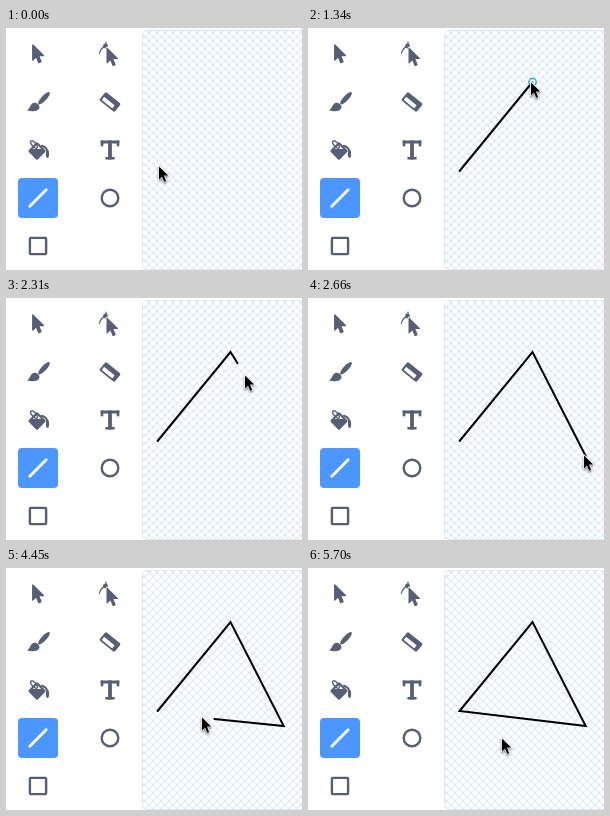
Write an HTML page with a canvas that moves like this. It is 296 px wide and 242 px high and loops after 7700 ms.

```html
<!DOCTYPE html>
<html lang="en">
<head>
<meta charset="utf-8">
<title>Drawing a triangle with the line tool</title>
<style>
html, body { margin: 0; width: 296px; height: 242px; overflow: hidden; background: #fff; }
canvas { display: block; }
</style>
</head>
<body>
<canvas id="stage" width="296" height="242"></canvas>
<script>
const W = 296, H = 242, LOOP = 7700;
const INK = '#575e75', BLUE = '#4c97ff';
const A = [151.6, 143], B = [224.5, 54], C = [277.7, 158];

const ctx = document.getElementById('stage').getContext('2d');

function trace(c, points, close) {
  c.beginPath();
  points.forEach(([x, y]) => c.lineTo(x, y));
  if (close) c.closePath();
}

function fill(c, color = INK) {
  c.fillStyle = color;
  c.fill();
}

function stroke(c, width, color = INK) {
  c.lineWidth = width;
  c.strokeStyle = color;
  c.lineCap = 'round';
  c.stroke();
}

function roundBox(c, x, y, w, h, r) {
  c.beginPath();
  c.roundRect(x, y, w, h, r);
}

function ellipse(c, x, y, rx, ry = rx, turn = 0) {
  c.beginPath();
  c.ellipse(x, y, rx, ry, turn, 0, 2 * Math.PI);
}

// Pointer with its tip at x, y: upright left edge, right edge at 45 degrees.
function arrow(c, x, y, size, color, edge) {
  const lean = Math.PI / 8;
  const wing = size * Math.sin(lean), base = size * Math.cos(lean);
  const half = size * .08, tail = size * 1.24;
  const notch = base - (wing - half) * Math.tan(lean);
  const side = [[wing, base], [half, notch], [half, tail]];
  const mirror = side.map(([px, py]) => [-px, py]).reverse();
  c.save();
  c.translate(x, y);
  c.rotate(-lean);
  trace(c, [[0, 0], ...side, ...mirror], true);
  c.lineJoin = 'round';
  if (edge) stroke(c, edge, color);
  fill(c, color);
  c.restore();
}

function selectIcon(c) {
  arrow(c, -5.2, -9, 15, INK, 1.4);
}

function reshapeIcon(c) {
  c.beginPath();
  c.arc(0, 2, 11, -2.9, -1.9);
  c.moveTo(-4, -12);
  c.lineTo(-4, -6);
  stroke(c, 1.2);
  ellipse(c, -4.5, -8, 2.4);
  fill(c);
  arrow(c, -3, -6, 15, '#fff', 2.6);
  arrow(c, -3, -6, 15, INK, 1);
}

function brushIcon(c) {
  ellipse(c, 6, -3.8, 8.2, 2.5, -.82);
  fill(c);
  c.beginPath();
  c.moveTo(-1.2, 1.2);
  c.bezierCurveTo(5, 5, 0, 12, -11, 8.2);
  c.bezierCurveTo(-7, 7, -8, -1, -1.2, 1.2);
  fill(c);
}

function eraserIcon(c) {
  c.rotate(.68);
  roundBox(c, -9.8, -5.4, 19.6, 10.8, 1.6);
  fill(c);
  roundBox(c, -7.8, -.4, 13.5, 4, .6);
  fill(c, '#fff');
}

function bucketIcon(c) {
  c.save();
  c.translate(-1, 1);
  c.rotate(Math.PI / 4);
  roundBox(c, -6.5, -6.5, 13, 13, 1.5);
  fill(c);
  c.restore();
  trace(c, [[-1, -5.2], [3.2, -1], [-5.2, -1]], true);
  fill(c, '#fff');
  ellipse(c, -4, -5.5, 2, 4.6, -.7);
  stroke(c, 1.4);
  c.beginPath();
  c.arc(2, 3, 7.5, -1.3, 0);
  stroke(c, 2);
  ellipse(c, 9.5, 4, 1.6, 4);
  fill(c);
}

function textIcon(c) {
  c.fillStyle = INK;
  c.fillRect(-9.3, -9.5, 18.6, 3);
  for (const x of [-9.3, 6.7]) c.fillRect(x, -9.5, 2.6, 5.8);
  c.fillRect(-1.9, -9.5, 3.8, 19);
  c.fillRect(-4.6, 7, 9.2, 2.5);
}

function lineIcon(c) {
  roundBox(c, -20, -20, 40, 40, 4);
  fill(c, BLUE);
  trace(c, [[-8.2, 8.2], [8.2, -8.2]]);
  stroke(c, 2.8, '#fff');
}

function ovalIcon(c) {
  ellipse(c, 0, 0, 8.3);
  stroke(c, 2.4);
}

function boxIcon(c) {
  roundBox(c, -8.1, -8.1, 16.2, 16.2, .8);
  stroke(c, 2.4);
}

const icons = [selectIcon, reshapeIcon, brushIcon, eraserIcon, bucketIcon,
  textIcon, lineIcon, ovalIcon, boxIcon];

function paintBackdrop() {
  const layer = document.createElement('canvas');
  layer.width = W;
  layer.height = H;
  const c = layer.getContext('2d');
  c.fillStyle = '#fff';
  c.fillRect(0, 0, W, H);

  icons.forEach((draw, i) => {
    c.save();
    c.translate(32 + 72 * (i % 2), 26 + 48 * Math.floor(i / 2));
    draw(c);
    c.restore();
  });

  roundBox(c, 136.5, 2.5, 180, 239, 4);
  stroke(c, 1, '#e3e9f2');
  c.clip();
  c.fillStyle = '#e6eef6';
  for (let row = 0; row < 60; row++)
    for (let col = 1 - row % 2; col < 41; col += 2)
      c.fillRect(137 + col * 4, 3 + row * 4, 4, 4);
  return layer;
}

const mix = (p, q, u) => p.map((v, i) => v + (q[i] - v) * u);
const easeOut = u => 1 - (1 - u) ** 1.35;
const easeBoth = u => (u + u * u * (3 - 2 * u)) / 2;
const lag = u => easeBoth(u) - .06 * Math.sin(Math.PI * u);

// Progress 0..1 in n even steps between two times.
function steps(t, from, to, n) {
  const k = Math.floor((t - from) / (to - from) * (n - 1) + 1e-6);
  return Math.max(0, Math.min(1, k / (n - 1)));
}

function pose(t) {
  if (t < 1340) {
    const u = t < 90 ? 0 : steps(t, 2, 620, 8);
    return { cursor: mix([152, 137], [222, 53], easeBoth(u)), path: u ? [A, mix(A, B, lag(u))] : [] };
  }
  if (t < 2310) {
    const u = steps(t, 1340, 1860, 7);
    return { cursor: mix([222, 53], [225, 58], u), path: [A, B], node: B };
  }
  if (t < 3290) {
    const u = easeOut(steps(t, 2310, 2660, 5));
    return { cursor: mix([238, 76], [275, 156], u), path: [A, B, mix([231.5, 65.3], C, u)] };
  }
  if (t < 4010) {
    return { cursor: [275, t < 3380 ? 157 : 158], path: [A, B, C], node: C };
  }
  if (t < 4800) {
    const u = steps(t, 4010, 4710, 9);
    const cursor = mix([270, 157], [156, 144], easeBoth(u));
    if (!u) return { cursor, path: [A, B, C], node: C };
    return { cursor, path: [A, B, C, mix(C, [162, 146.5], lag(u))] };
  }
  if (t < 5510) {
    const u = steps(t, 4800, 5060, 4);
    const cursor = mix([154, 144], [152, 143], u);
    if (u < .5) return { cursor, path: [A, B, C, mix([158, 146], A, u)] };
    return { cursor, path: [A, B, C], closed: true, node: A };
  }
  const u = easeOut(steps(t, 5510, 5700, 3));
  return { cursor: mix([164, 151], [193, 169], u), path: [A, B, C], closed: true };
}

function drawNode([x, y]) {
  ellipse(ctx, x, y, 3.7);
  fill(ctx, 'rgba(255,255,255,.55)');
  stroke(ctx, 1.3, '#0c9fe8');
}

function drawCursor([x, y]) {
  ctx.save();
  ctx.shadowColor = 'rgba(0,0,0,.4)';
  ctx.shadowBlur = 2;
  ctx.shadowOffsetY = 1;
  arrow(ctx, x + 1, y + 1.4, 13, '#fff', 2);
  ctx.restore();
  arrow(ctx, x + 1, y + 1.4, 13, '#000');
}

const backdrop = paintBackdrop();

function frame(now) {
  const { cursor, path, closed, node } = pose(now % LOOP);
  ctx.drawImage(backdrop, 0, 0);
  trace(ctx, path, closed);
  ctx.lineJoin = 'miter';
  stroke(ctx, 2, '#000');
  if (node) drawNode(node);
  drawCursor(cursor.map(Math.round));
}

let start;
function tick(now) {
  start ??= now;
  frame(Math.max(0, now - start));
  requestAnimationFrame(tick);
}
frame(0);
requestAnimationFrame(tick);
</script>
</body>
</html>
```
